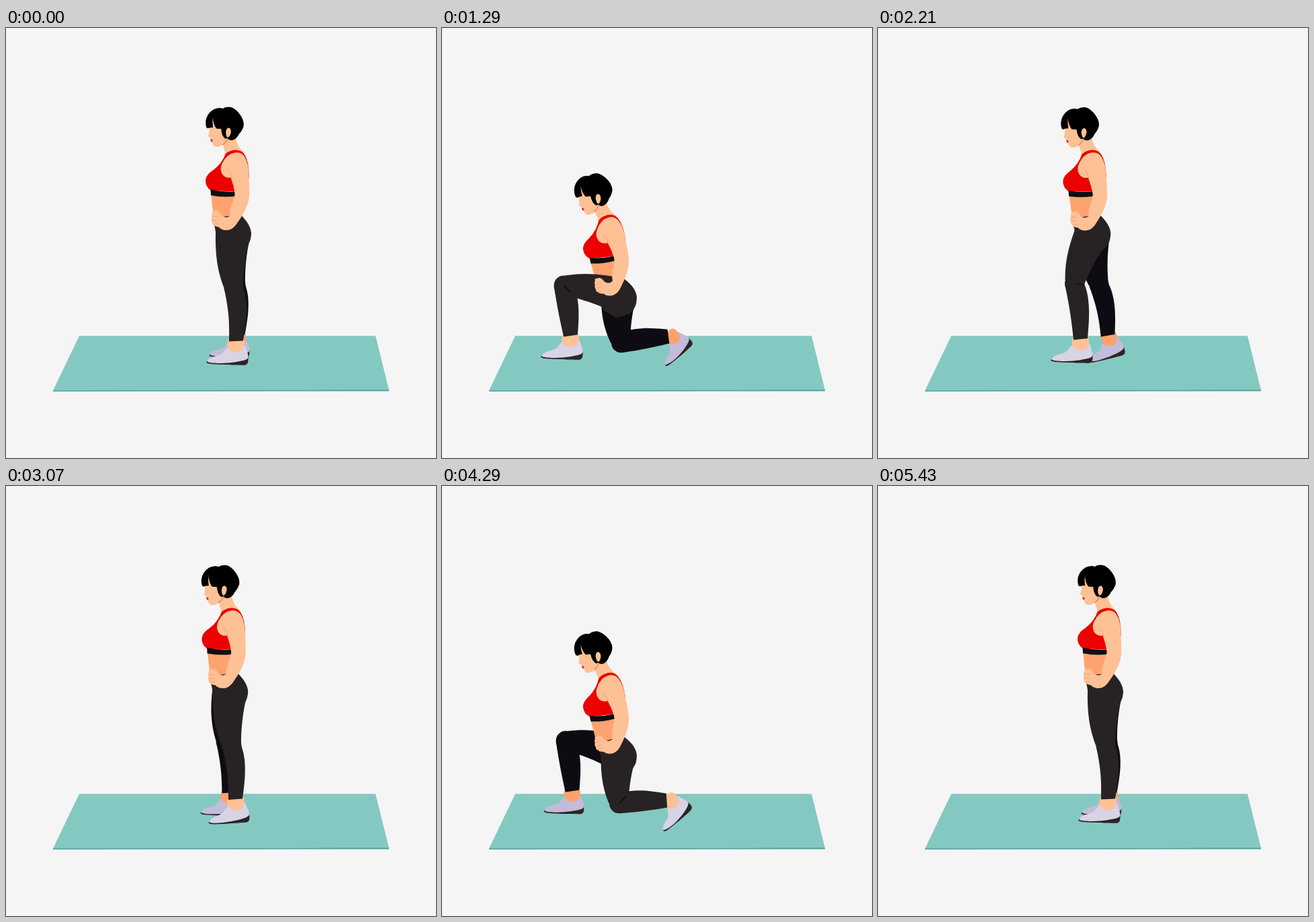
An HTML page that plays this animation: 640 by 640 pixels, repeating every 6 s.

```html
<!DOCTYPE html>
<html lang="en">
<head>
<meta charset="utf-8">
<title>Alternating lunges</title>
<style>
html, body { margin: 0; width: 100%; height: 100%; overflow: hidden; background: #f5f5f5; }
svg { display: block; width: 100vw; height: 100vh; }
</style>
</head>
<body>
<svg viewBox="0 0 640 640">
  <rect width="640" height="640" fill="#f5f5f5"/>
  <path d="M70 539L570 538V540.5L70 541Z" fill="#50a29c"/>
  <path d="M109 458.3H550L570 538.5L70 539.5Z" fill="#84c9c1"/>

  <g id="far"></g>

  <g class="body">
    <path d="M305 247L341 249L342 284L325 288L309 290Q308 270 305 247Z" fill="#fea36f"/>
    <path d="M324 165L342 164Q344 177 354 185L345 200L318 204Q327 192 326 184Q323 178 323 170Z" fill="#fec195"/>
    <path d="M327 187Q333 182 341 181.5Q350 181 355 188Q362 199 361.7 222L350 244L305 242Q296.5 236 297 226Q298 218 309 211Q321 202 327 187Z" fill="#ec0000"/>
    <path d="M304.500 240.500Q322 244.500 341 243.500L341 250.500Q322 252.500 305 249Z" fill="#0f0d11"/>
  </g>

  <g id="near"></g>
  <g class="body">
    <path d="M309 290Q315 283 325 280.5L350 278.500C358 287 365 296 365 307C364 319 360 326 350 332L330 335L312 320Q314 306 309 290Z" fill="#272324"/>
  </g>
  <g id="nearTop"></g>

  <g class="body">
    <path d="M341 185.500Q351 184 356 193Q362 204 361.500 222C362 236 363 248 361 257C358 270 350 282 345 289C340 297 335 301 328 301Q321 301 316 296Q311 296 309 293Q306 292 306.500 288Q304.500 285 306.500 281Q305 278 307.500 276Q306 273 309 272.500L315 272Q319 274 321 279Q327 284 333 280Q333 270 337 260Q341 252 340.500 246Q339 234 334.500 222.500Q326 224 321.500 217Q317.500 209 322 201Q329 187 341 185.500Z" fill="#fec195"/>
    <path d="M329 209Q334 213 335.500 224M307.500 281Q311 279 315 281M307 287Q311 285 315 286.500M309 292.500L315 291" fill="none" stroke="#f5a272" stroke-width="1"/>
    <path d="M303 146L334 142L335 160Q331 168 326 171Q320 177 314 177Q308 177 307.500 172L305 169L305.500 164L300.500 161.500Q303 156 303 146Z" fill="#fec195"/>
    <path d="M304 164.500L307.500 166.500Q308 169 305.500 169.500Z" fill="#ee1030"/>
    <path d="M331 162Q329 169 322 174" fill="none" stroke="#f27a48" stroke-width="1.300"/>
    <g transform="translate(-1.3 0)">
      <path d="M299.500 148Q296.500 138 302 129Q309 119 319 119Q322 119 324 120Q329 116.500 337 118Q344 121 349 128Q356 137 355 146Q353 153 348 158Q345 165 338 167Q333 167.500 331 164L328 165Q322 161 321.500 150Q313 150 309 148Q304 148 302 149.500Z" fill="#000"/>
      <path d="M309.500 132Q309 142 314.500 150L309.500 149Q308 140 309.500 132Z" fill="#fec195"/>
      <path d="M328.500 155Q329 148.500 333 148.500Q337 150 336 156Q334 163 331 163Q328.500 161 328.500 155Z" fill="#fec195"/>
    </g>
  </g>
</svg>
<script>
const TICK = 6000 / 84, TURN = 16.5;
const { sin, cos, min, max, hypot, PI } = Math;

const legs = {
  near: { knee: [339, 386], ankle: [342.5, 466], size: 1, lift: 8,
          cloth: "#272324", skin: "#fec195", shoe: "#d9d3e6" },
  far:  { knee: [342, 382], ankle: [345, 457], size: 0.96, lift: 3,
          cloth: "#0e0c12", skin: "#fea26c", shoe: "#c3bbda" }
};

// Flat foot outlines around the ankle.
const foot = {
  sole: [[-42, 30], [-38, 34], [0, 35.5], [15, 35], [18, 27], [16, 21], [4, 28], [-15, 31]],
  upper: [[-12, 9], [-22, 19], [-38, 25], [-42, 31], [-25, 33], [0, 31], [17, 26], [16, 15], [12, 6], [8, 14], [-4, 16]],
  skin: [[-10, -4], [10, -4], [11, 10], [0, 17], [-12, 10]]
};

// Half widths along a limb; a bent knee pushes the shin forward.
const thigh = {
  front: s => 28 - 13 * s ** 2.5,
  back: s => 14 + 11 * (1 - s) ** 2
};
const shin = {
  front: (s, turn) => 14.5 - 4 * s + (4 * turn - 3) * sin(PI * s),
  back: s => 14 - 3.5 * s + 5 * sin(PI * s ** 0.8)
};

const $ = id => document.getElementById(id);
const fix = p => p[0].toFixed(2) + " " + p[1].toFixed(2);
const add = (p, x, y) => [p[0] + x, p[1] + y];
const path = (d, fill) => `<path d="${d}" fill="${fill}"/>`;
const clamp = x => max(0, min(1, x));
const smooth = x => x * x * (3 - 2 * x);

function unit(p, q) {
  const x = q[0] - p[0], y = q[1] - p[1], l = hypot(x, y);
  return [x / l, y / l];
}

// Offsets from standing; u runs from 0 (upright) to 1 (deepest).
function poseAt(u) {
  const glide = (1 - cos(PI * u ** 0.65)) / 2;
  const sink = smooth(clamp(1.4 * u - 0.32));
  const stride = clamp(u / 0.727);
  const push = min(1, 2 * u);
  const hip = [-76 * glide, 96 * sink];
  const stepX = -151 * stride * (1 + 0.12 * sin(PI * stride));
  const arc = sin(PI * u);
  return {
    hip, stepX, push,
    lean: 9 * glide,
    knee: [stepX - 8.5 * arc - 5 * u, -11 * arc],
    rear: [hip[0] * (0.62 + 0.42 * u), hip[1] * 0.91]
  };
}

function curve(pts, closed) {
  const n = pts.length;
  const get = i => closed ? pts[(i + n) % n] : pts[max(0, min(n - 1, i))];
  let d = "";
  for (let i = 0; i < (closed ? n : n - 1); i++) {
    const [a, b, c, e] = [get(i - 1), get(i), get(i + 1), get(i + 2)];
    d += "C" + fix(add(b, (c[0] - a[0]) / 6, (c[1] - a[1]) / 6)) + " "
      + fix(add(c, (b[0] - e[0]) / 6, (b[1] - e[1]) / 6)) + " " + fix(c);
  }
  return d;
}

function limb(p, q, shape, turn) {
  const [ux, uy] = unit(p, q), len = hypot(q[0] - p[0], q[1] - p[1]);
  const side = (s, w) => add(p, ux * len * s - uy * w, uy * len * s + ux * w);
  const front = [], back = [];
  for (let i = 0; i <= 6; i++) {
    const s = i / 6;
    front.push(side(s, shape.front(s, turn)));
    back.unshift(side(s, -shape.back(s)));
  }
  return "M" + fix(front[0]) + curve(front) + "L" + fix(back[0]) + curve(back) + "Z";
}

// Rising on the toes turns the foot about the ankle and curls its tip.
function footPart(name, ankle, bend, size) {
  const a = 0.8 * bend;
  const pts = foot[name].map(([px, py]) => {
    const x = px * (1 - 0.1 * bend) + 4 * bend;
    const y = py - 3 * bend * (min(px, 0) / 42) ** 2;
    return add(ankle, size * (x * cos(a) + y * sin(a)), size * (y * cos(a) - x * sin(a)));
  });
  return "M" + fix(pts[0]) + curve(pts, true) + "Z";
}

function crease(knee, a, b, turn) {
  const x = a[1] + b[1], y = -a[0] - b[0], l = hypot(x, y);
  const end = add(knee, x / l * 15, y / l * 15);
  return `<path d="M${fix(knee)}L${fix(end)}" stroke="#0a090b" stroke-width="1.5"
    opacity="${clamp(turn * 2 - 0.4).toFixed(2)}"/>`;
}

function drawLeg(leg, pose, hip, leads) {
  const { push } = pose;
  const knee = add(leg.knee, ...(leads ? pose.knee : pose.rear));
  const ankle = leads ? add(leg.ankle, pose.stepX, -leg.lift * push)
    : add(leg.ankle, -8 * push, 2 * push);
  const a = unit(hip, knee), b = unit(knee, ankle);
  const turn = Math.abs(a[0] * b[1] - a[1] * b[0]);
  const part = name => footPart(name, ankle, leads ? 0 : push, leg.size);
  const shoe = path(part("sole"), "#2a2527") + path(part("upper"), leg.shoe) + path(part("skin"), leg.skin);
  const cloth = path(limb(hip, knee, thigh, turn), leg.cloth)
    + path(limb(knee, ankle, shin, turn), leg.cloth)
    + `<circle cx="${knee[0]}" cy="${knee[1]}" r="14.5" fill="${leg.cloth}"/>`;
  return [shoe, cloth + crease(knee, a, b, turn)];
}

const bodies = document.querySelectorAll(".body");

function draw(ms) {
  const tick = Math.floor((ms % 6000 + 3) / TICK) % 84;
  const k = tick % 42, nearLeads = tick < 42;
  const pose = poseAt(max(0, min(k, 2 * TURN - k)) / TURN);
  const hip = add([340, 305], ...pose.hip);
  bodies.forEach(g => g.setAttribute("transform",
    `translate(${pose.hip}) rotate(${-pose.lean} 340 305)`));
  $("far").innerHTML = drawLeg(legs.far, pose, hip, !nearLeads).join("");
  [$("near").innerHTML, $("nearTop").innerHTML] = drawLeg(legs.near, pose, hip, nearLeads);
}

const start = performance.now();
function loop() {
  draw(performance.now() - start);
  requestAnimationFrame(loop);
}
loop();
</script>
</body>
</html>
```
